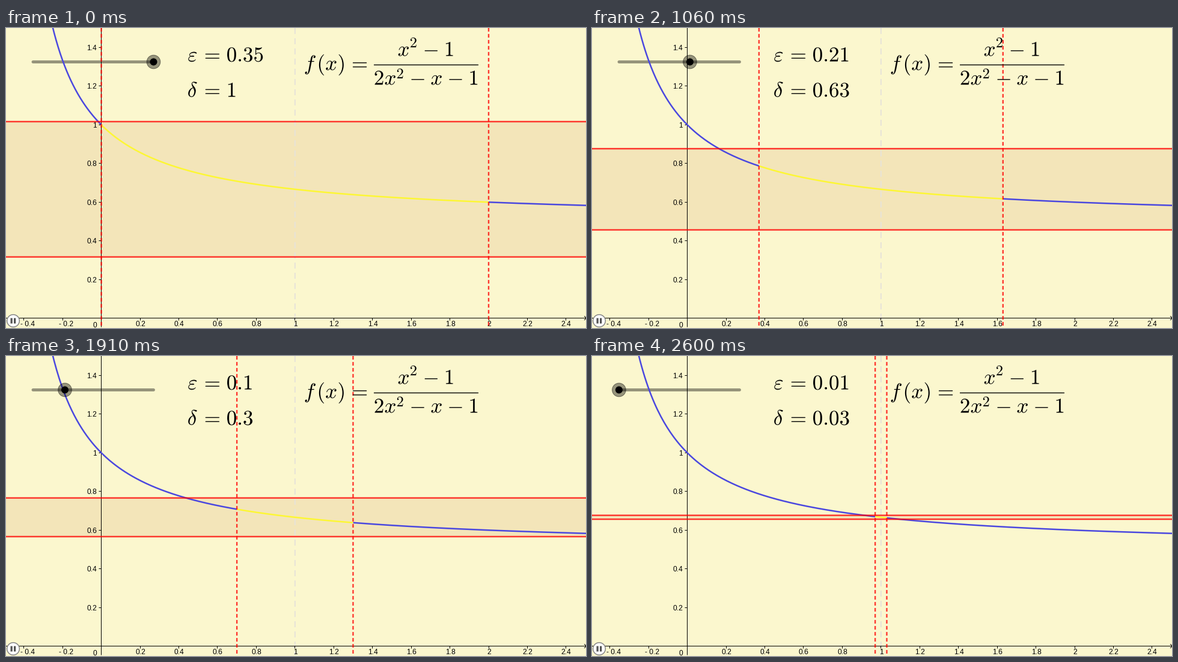
Write a matplotlib script that moves like this. It is 965 px wide and 500 px high and loops after 2.68 s.

```python
import matplotlib.pyplot as plt
import numpy as np
from matplotlib.animation import FuncAnimation
from matplotlib.patches import Circle, PathPatch, Rectangle
from matplotlib.textpath import TextPath
from matplotlib.transforms import Affine2D

W, H, DPI = 965, 500, 100
PT = 72 / DPI                      # points per pixel
LOOP_MS, STEP_MS = 2680, 20
X0, Y0, UNIT = 158.6, 483.6, 322.2
LIMIT = 2 / 3
EM = 35.1                          # formula size in pixels

PAPER, BAND = "#fbf7ce", "#f3e5b9"
BLUE, YELLOW, RED = "#4a47df", "#fdf733", "#ff0000"

plt.rcParams["mathtext.fontset"] = "cm"
plt.rcParams["font.family"] = "Liberation Sans"
plt.rcParams["path.snap"] = False  # keep lines at their exact positions

fig = plt.figure(figsize=(W / DPI, H / DPI), dpi=DPI, facecolor=PAPER)
ax = fig.add_axes([0, 0, 1, 1])
ax.set(xlim=(0, W), ylim=(H, 0))
ax.axis("off")


def px(x):
    return X0 + UNIT * x


def py(y):
    return Y0 - UNIT * y


def f(x):
    return (x + 1) / (2 * x + 1)


def line(xs, ys, color, width, z, **kw):
    return ax.plot(xs, ys, color=color, lw=width * PT, zorder=z, **kw)[0]


def dashed(x, color, width, on, off, z, **kw):
    return line([x, x], [0, 498], color, width, z, dash_capstyle="butt",
                linestyle=(0, (on / width, off / width)), **kw)


def curve_piece(color, z):
    return line([], [], color, 2.5, z, solid_capstyle="butt")


def trace(piece, start, end):
    xs = np.linspace(start, end, 150)
    piece.set_data(px(xs), py(f(xs)))


def math_path(tex, size=EM):
    return TextPath((0, 0), f"${tex}$", size=size)


def add_math(tex, x, base, size=EM, ink_left=True):
    """Place a formula piece by its left ink edge, or by its origin."""
    path = math_path(tex, size)
    if ink_left:
        x -= path.get_extents().x0
    place = Affine2D().scale(1, -1).translate(x, base)
    patch = PathPatch(path, fc="black", lw=0, zorder=9,
                      transform=place + ax.transData)
    return ax.add_patch(patch)


def label(x, y, s, ha):
    ax.text(x, y, s, ha=ha, va="baseline", size=12 * PT, zorder=3)


# coordinate axes
line([0, W], [483.5, 483.5], "black", 1, 3)
line([158.5, 158.5], [0, 498], "black", 1, 3)
line([962.5, 965.5, 962.5], [480.5, 483.5, 486.5], "black", 1, 3)
for n in range(-2, 13):
    if n == 0:
        continue
    x = np.floor(px(n / 5)) + 0.5
    line([x, x], [484, 487], "black", 1, 3)
    if n > 0:
        label(x + 0.5, 497, f"{n / 5:g}", "center")
    else:
        label(x + 18, 497, f"- {-n / 5:g}", "right")
for n in range(1, 8):
    y = np.floor(py(n / 5)) + 0.5
    line([155, 158], [y, y], "black", 1, 3)
    label(151, y + 4.5, f"{n / 5:g}", "right")
label(147.5, 499, "0", "center")

# graph, band and guides
dashed(px(1), "#e7e3d8", 2, 10, 7, 2)
band = ax.add_patch(Rectangle((0, 0), W, 0, fc=BAND, lw=0, zorder=1))
left, right = curve_piece(BLUE, 4), curve_piece(BLUE, 4)
near = curve_piece(YELLOW, 5)
levels = [line([0, W], [0, 0], RED, 2.5, 6, alpha=0.77) for _ in range(2)]
sides = [dashed(0, RED, 2.4, 6, 4, 6, alpha=0.77) for _ in range(2)]

# slider
line([45, 245.5], [56.5, 56.5], "black", 5, 3.5, alpha=0.4,
     solid_capstyle="round")
knob = [Circle((0, 56.5), 11.3, fc=(0, 0, 0, 0.4), ec=(0, 0, 0, 0.45),
               lw=PT, zorder=7),
        Circle((0, 56.5), 6, fc="black", lw=0, zorder=7)]
for part in knob:
    ax.add_patch(part)

# pause button
ax.add_patch(Circle((12, 488), 10.3, fc="white", ec="#858585",
                    lw=1.5 * PT, zorder=8))
for x in (7.5, 13):
    ax.add_patch(Rectangle((x, 483.5), 3.3, 9, fc="#555555", lw=0, zorder=8))

# readouts
EPS_BASE, DELTA_BASE = 55.8, 114.8
add_math(r"\varepsilon", 303.3, EPS_BASE)
add_math(r"\delta", 303.2, DELTA_BASE)
for base in (EPS_BASE, DELTA_BASE):
    add_math("=", 331.7, base)
eps_text = add_math("0", 366.7, EPS_BASE, ink_left=False)
delta_text = add_math("0", 366.7, DELTA_BASE, ink_left=False)

# function definition
MID, TOP, BOTTOM = 70.3, 46.7, 94.6
for tex, x in (("f", 497.5), ("(", 520.8), ("x", 532.3), (")", 553.6),
               ("=", 576.9)):
    add_math(tex, x, MID)
for tex, x in (("x", 652.7), ("-", 696.6), ("1", 731.9)):
    add_math(tex, x, TOP)
for tex, x in (("2", 613.6), ("x", 630.6), ("-", 674.4), ("x", 707.5),
               ("-", 737.3), ("1", 772.5)):
    add_math(tex, x, BOTTOM)
add_math("2", 673, TOP - 14.4, 0.7 * EM)
add_math("2", 650.8, BOTTOM - 10.6, 0.7 * EM)
line([612, 786], [61.5, 61.5], "black", 1.4, 9, solid_capstyle="butt")


def update(i):
    t = (i + 0.5) * STEP_MS
    step = int(np.interp(t, [0, 620, 750, 1140, LOOP_MS],
                         [0, 8, 10, 15, 35]) + 0.05)
    eps = (35 - step) / 100
    delta = min(1, 3 * eps)

    top, bottom = py(LIMIT + eps), py(LIMIT - eps)
    band.set_y(top)
    band.set_height(bottom - top)
    for guide, y in zip(levels, (top, bottom)):
        guide.set_ydata([y, y])
    for guide, x in zip(sides, (px(1 - delta), px(1 + delta))):
        guide.set_xdata([x, x])

    trace(left, -0.27, 1 - delta)
    trace(near, 1 - delta, 1 + delta)
    trace(right, 1 + delta, 2.52)
    for part in knob:
        part.center = (245.5 - 590 * (0.35 - eps), 56.5)
    eps_text.set_path(math_path(f"{eps:.2g}"))
    delta_text.set_path(math_path(f"{delta:.2g}"))


anim = FuncAnimation(fig, update, frames=LOOP_MS // STEP_MS,
                     interval=STEP_MS, repeat=True, repeat_delay=0)
plt.show()
```
